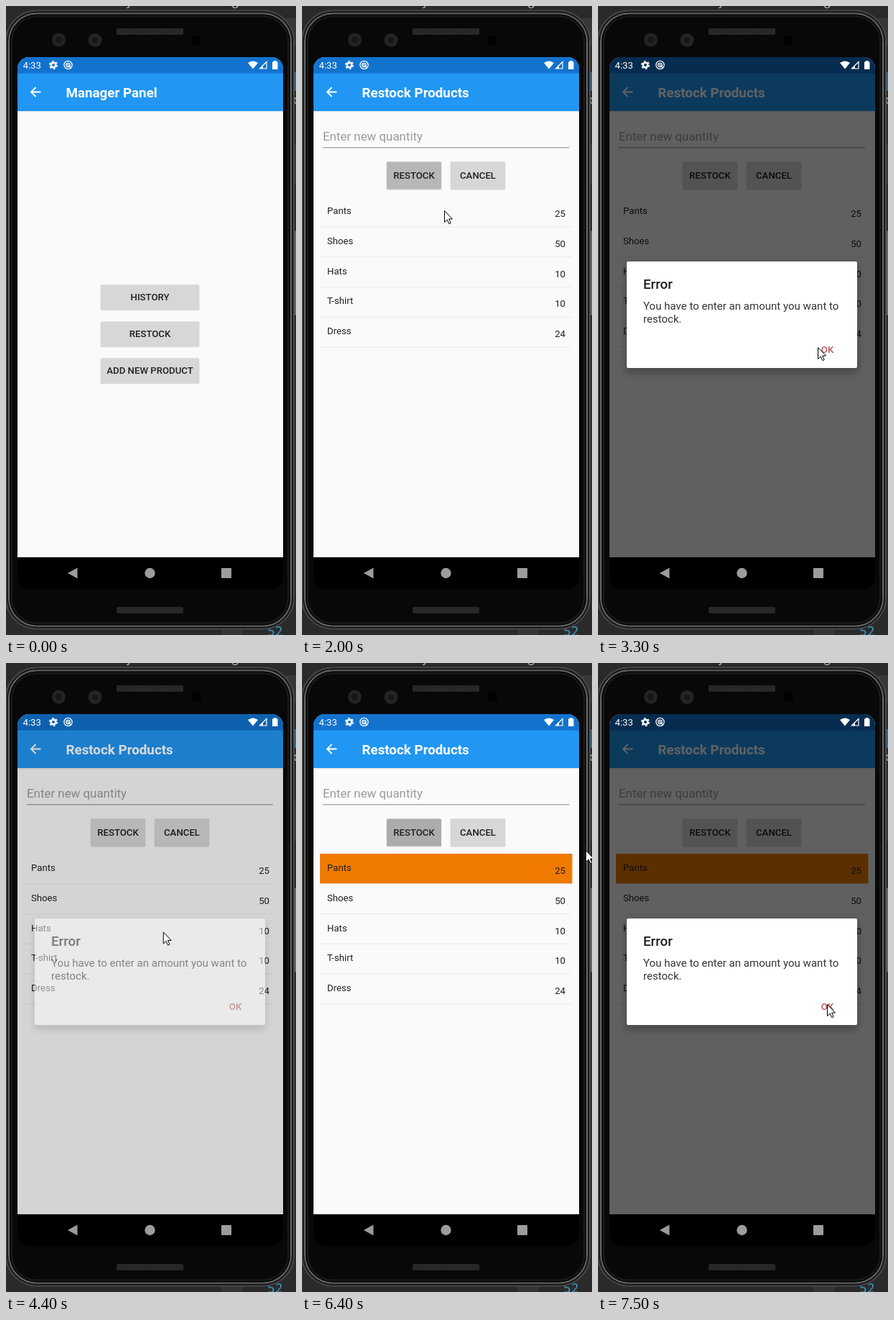
An HTML page for the animation above (8 s loop, 404x874 px).

```html
<!DOCTYPE html>
<html lang="en">
<head>
<meta charset="utf-8">
<title>Restock screen</title>
<style>
  html, body { margin: 0; width: 100%; height: 100%; overflow: hidden; background: #2b2b2b; }
  svg { display: block; width: 404px; height: 874px; }
  text { font: 400 13.2px Roboto, sans-serif; fill: #202020; white-space: pre; }
  .title { font-size: 18.8px; font-weight: 700; fill: #fff; }
  .btn { font-weight: 500; text-anchor: middle; }
  .num { text-anchor: end; }
  .hint { font-size: 16.9px; fill: #9b9b9b; }
  .msg { font-size: 15.06px; fill: #353535; }
  .head { font-size: 18.8px; font-weight: 500; }
  .code { font: 18px "Noto Sans Mono", monospace; fill: #3a9cc4; }
  .edge { font: 16px "Open Sans", sans-serif; fill: #c8c8c8; }
</style>
</head>
<body>
<svg viewBox="0 0 404 874">
  <defs>
    <clipPath id="screen"><rect x="16" y="71" width="370" height="739" rx="16"/></clipPath>
    <pattern id="mesh" width="3" height="3" patternUnits="userSpaceOnUse">
      <rect width="3" height="3" fill="#2e2e2e"/><path d="M0 3L3 0" stroke="#1b1b1b"/>
    </pattern>
    <filter id="soft" x="-10%" y="-20%" width="120%" height="150%"><feGaussianBlur stdDeviation="5"/></filter>
  </defs>

  <!-- desktop behind the phone -->
  <rect width="404" height="874" fill="#2a2a2b"/>
  <path d="M388 17H404V56H388ZM400 192H404V248H400Z" fill="#383838"/>
  <path d="M300 866H330V874H300Z" fill="#353537"/>
  <text class="edge" x="168" y="-1">y</text><text class="edge" x="315" y="-1">g</text>
  <path d="M401 92H404V118H401Z" fill="#1b6fa8"/>
  <text class="edge" x="400" y="136">o</text>
  <text class="code" x="364" y="875">52</text>

  <!-- phone -->
  <rect x="400" y="312" width="4" height="118" rx="2" fill="#666"/>
  <g id="body"></g>
  <rect x="154" y="31" width="93" height="9" rx="2" fill="url(#mesh)"/>
  <rect x="154" y="835" width="93" height="9" rx="2" fill="url(#mesh)"/>
  <g fill="#242424"><circle cx="73.5" cy="47" r="9.5"/><circle cx="124" cy="47.5" r="9.5"/></g>
  <g fill="#161616"><circle cx="73.5" cy="47" r="4.5"/><circle cx="124" cy="47.5" r="4"/></g>
  <circle cx="265" cy="47.5" r="7" fill="#010101"/>

  <g clip-path="url(#screen)">
    <rect x="16" y="71" width="370" height="695" fill="#fafafa"/>
    <rect x="16" y="146" width="370" height="2" opacity=".05"/>
    <rect x="16" y="71" width="370" height="75" fill="#2196f3"/>
    <rect x="16" y="71" width="370" height="22.5" fill="#1273ce"/>
    <path d="M48.5 119.5H35.5M41.5 113L35 119.5L41.5 126" fill="none" stroke="#fff" stroke-width="1.9"/>
    <g id="menu"></g>
    <g id="stock"></g>
    <rect id="dim" x="16" y="71" width="370" height="695"/>
    <g id="dialog">
      <rect x="38" y="357" width="325" height="154" rx="6" opacity=".22" filter="url(#soft)"/>
      <rect x="40" y="355" width="321" height="148" rx="2" fill="#fff"/>
      <text class="head" x="63" y="392.5">Error</text>
      <text class="msg" x="63" y="421.5">You have to enter an amount you want to</text>
      <text class="msg" x="63" y="439.5">restock.</text>
      <text class="btn" x="319.5" y="482" style="fill:#b65a5e">OK</text>
    </g>

    <!-- status bar -->
    <text x="23.5" y="87" style="fill:#fff">4:33</text>
    <g fill="none" stroke="#fff">
      <circle cx="66" cy="82" r="3.3" stroke-width="2.6"/>
      <circle cx="66" cy="82" r="5.3" stroke-width="1.6" stroke-dasharray="2.8 2.75"/>
      <circle cx="86.5" cy="82" r="5.6" stroke-width="1.3"/>
      <circle cx="86.5" cy="82" r="2.7" stroke-width="1.3"/>
      <path d="M85.5 81L91 86.5" stroke-width="1.4"/>
      <path d="M353.5 87H363V77.5Z" stroke-width="1.2"/>
    </g>
    <path d="M337 79Q344 74 351 79L344 87.5ZM358 82.5V87H353.5ZM371 77.5H373V76H376.5V77.5H378.5V88H371Z" fill="#fff"/>

    <!-- navigation bar -->
    <rect x="16" y="766" width="370" height="44"/>
    <g fill="#9c9c9c"><path d="M86 788L99.5 780.5V795.5Z"/><circle cx="200.5" cy="788" r="7.2"/><rect x="300" y="781" width="14" height="14" rx="1"/></g>
  </g>

  <path id="cursor" d="M.5 .5V16.5L4.3 13L6.8 18.7L9.2 17.6L6.7 12H11.5Z" fill="#fff" stroke="#000"/>
</svg>

<script>
const LOOP = 8000, STEP = 100;
const $ = id => document.getElementById(id);

// Nested outlines, from the outer rim inwards.
$('body').innerHTML = ['#4a4a4a', '#1c1c1c', '#686868', '#0c0c0c', '#1a1a1a'].map((stroke, i) => {
  const d = i * 2;
  return `<rect x="${d}" y="${6.5 + d}" width="${401 - 2 * d}" height="${859 - 2 * d}" rx="${43 - d}"
    fill="#080808" stroke="${stroke}" stroke-width="2"/>`;
}).join('');

const text = (x, y, s, cls = '') => `<text class="${cls}" x="${x}" y="${y}">${s}</text>`;

const button = (x, y, w, h, label, id) => `
  <rect x="${x - .5}" y="${y}" width="${w + 1}" height="${h + 1.3}" rx="2" opacity=".13"/>
  <rect x="${x}" y="${y}" width="${w}" height="${h}" rx="1.5" fill="#d6d7d7"/>
  ${id ? `<rect id="${id}" x="${x}" y="${y}" width="${w}" height="${h}" rx="1.5"/>` : ''}
  ${text(x + w / 2, y + h / 2 + 4.7, label, 'btn')}`;

const row = ([name, count], i) => {
  const y = 265 + i * 41.8;
  return text(35, y + 24, name) + text(367, y + 28, count, 'num') +
    `<rect x="25" y="${y + 41.3}" width="351" height="1" fill="#ececec"/>`;
};

$('menu').innerHTML = text(83.5, 127, 'Manager Panel', 'title') +
  ['HISTORY', 'RESTOCK', 'ADD NEW PRODUCT']
    .map((label, i) => button(132, 387.5 + 51 * i, 137, 34.5, label)).join('');

const items = { Pants: 25, Shoes: 50, Hats: 10, 'T-shirt': 10, Dress: 24 };
$('stock').innerHTML = text(83.5, 127, 'Restock Products', 'title') +
  text(29, 186.5, 'Enter new quantity', 'hint') +
  '<rect x="29" y="196.3" width="343" height="1" fill="#858585"/>' +
  button(118, 216.5, 76, 38, 'RESTOCK', 'press') +
  button(207, 216.5, 76, 38, 'CANCEL') +
  '<rect id="picked" x="25" y="265" width="351.5" height="42" fill="#f07a00"/>' +
  Object.entries(items).map(row).join('');

// Cursor moves: start, duration, end point. A point at the right edge hides it.
const EDGE = 404;
const moves = [
  [500, 300, 212, 452],
  [800, 400, 154, 219],
  [1900, 100, 198, 284],
  [2000, 200, 274, 430],
  [2200, 400, 352, 465],
  [2900, 400, 306, 474],
  [4300, 300, 149, 293],
  [4600, 400, 132, 288],
  [5500, 100, 274, 238],
  [5700, 300, 145, 232],
  [6300, 100, 395, 260],
  [6400, 100, EDGE, 290],
  [6900, 600, 319, 474]
];

const ramp = (t, from, to) => Math.min(1, Math.max(0, (t - from) / (to - from)));
const ripple = (t, click) => t < click ? 0 : 1 - ramp(t, click, click + 400);

function cursorAt(t) {
  let x = EDGE, y = 478;
  for (const [start, time, toX, toY] of moves) {
    const p = ramp(t, start, start + time), k = p * (2 - p);
    x += (toX - x) * k;
    y += (toY - y) * k;
  }
  return [x, y];
}

function draw(now) {
  const t = Math.floor(now % LOOP / STEP) * STEP;
  const page = ramp(t, 700, 900);
  const open = ramp(t, 2000, 2300) - ramp(t, 4200, 4500) + ramp(t, 6400, 6700);
  const [x, y] = cursorAt(t);
  const alpha = {
    menu: 1 - page,
    stock: page,
    press: .2 * (ripple(t, 1900) + ripple(t, 6400)),
    picked: ramp(t, 5200, 5400),
    dim: .615 * open ** 1.3,
    dialog: Math.sin(open * Math.PI / 2),
    cursor: x < EDGE ? 1 : 0
  };
  for (const id in alpha) $(id).setAttribute('opacity', alpha[id]);
  $('cursor').setAttribute('transform', `translate(${x} ${y})`);
}

const begin = performance.now();
function tick() {
  draw(performance.now() - begin);
  requestAnimationFrame(tick);
}
tick();
</script>
</body>
</html>
```
